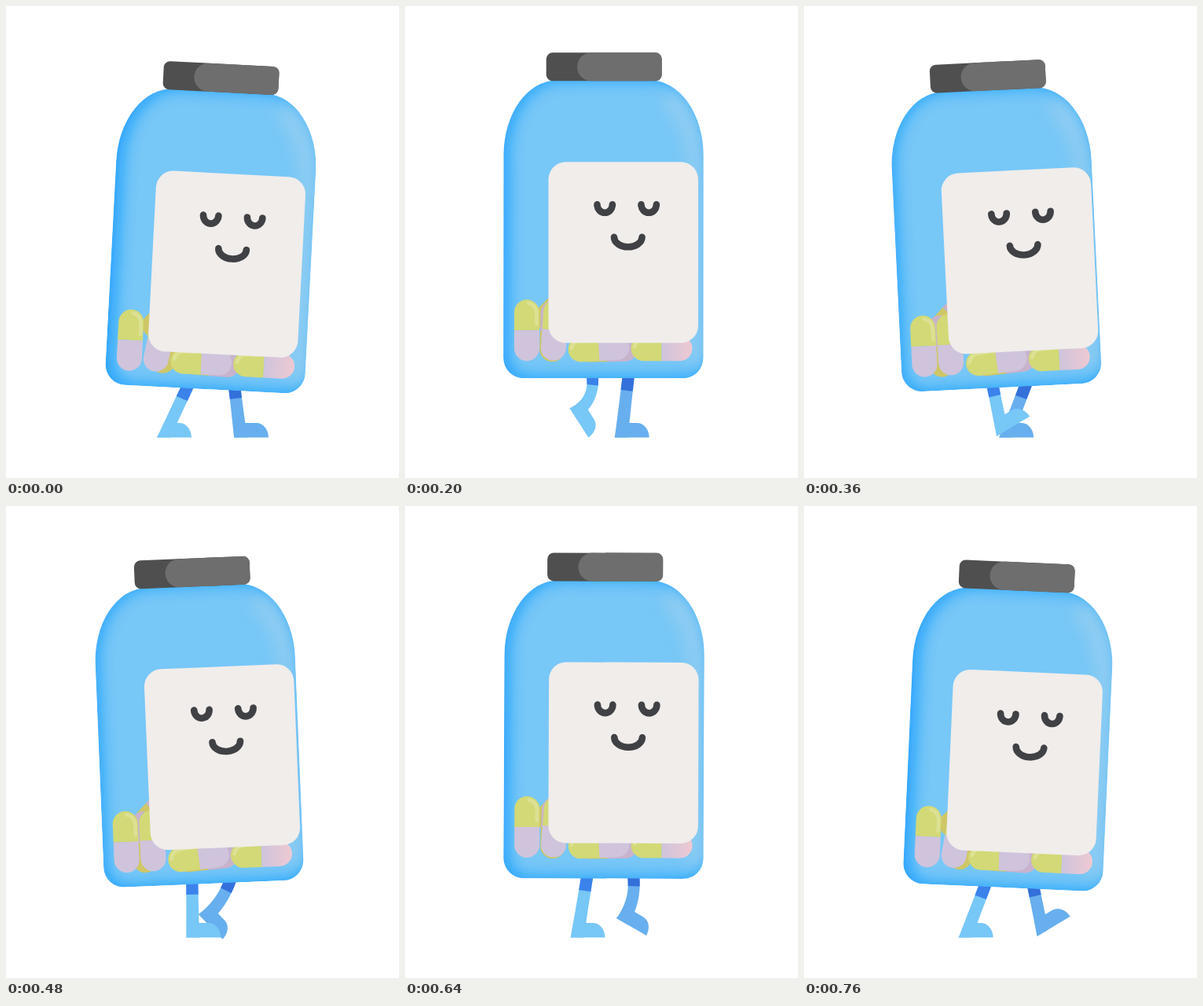
Recreate the animation shown at these times as an HTML page. Size 500 px wide and 600 px high, loop 800 ms.

```html
<!DOCTYPE html>
<html lang="en">
<head>
<meta charset="utf-8">
<title>Walking pill bottle</title>
<style>
  html, body { margin: 0; width: 100%; height: 100%; overflow: hidden; background: #fff; }
  svg { display: block; width: 100vw; height: 100vh; }
</style>
</head>
<body>
<svg viewBox="0 0 500 600">
  <defs>
    <path id="shape" d="M193.500 95H311.500A68 95 0 0 1 379.700 190L379.500 448A26 26 0 0 1 353.500 474H151.200A26 26 0 0 1 125.200 448L125.500 190A68 95 0 0 1 193.500 95Z"/>
    <clipPath id="inside"><use href="#shape"/></clipPath>
    <filter id="soft" filterUnits="userSpaceOnUse" x="0" y="0" width="500" height="600">
      <feGaussianBlur stdDeviation="10"/>
    </filter>
    <linearGradient id="rosy" x2="0" y2="1">
      <stop offset="0" stop-color="#cfc4dc"/>
      <stop offset="1" stop-color="#eec9d2"/>
    </linearGradient>
  </defs>

  <g id="back"></g>
  <g id="front"></g>

  <g id="bottle">
    <g clip-path="url(#inside)">
      <use href="#shape" fill="#77c7f7"/>
      <g id="glow">
        <path id="rim" fill="#0c97ff" fill-rule="evenodd" opacity=".82" filter="url(#soft)"/>
      </g>
      <path d="M334 114C357 137 371 166 373 225V455" fill="none" stroke="#a2d2ee" stroke-width="24" opacity=".6" filter="url(#soft)"/>
    </g>
    <g id="pills"></g>
    <g id="label">
      <rect x="182.5" y="199" width="190.5" height="230" rx="22" fill="#f0edeb"/>
      <g fill="none" stroke="#404145" stroke-width="8.6" stroke-linecap="round">
        <path d="M244.5 253a9.7 10.5 0 0 0 19.4 0"/>
        <path d="M300.5 253a9.7 10.5 0 0 0 19.4 0"/>
        <path d="M266 294.5a17.8 12.5 0 0 0 35.6 0"/>
      </g>
    </g>
    <rect x="179.7" y="60" width="147" height="36" rx="8" fill="#4f4f4f"/>
    <path d="M237 60H318.700a8 8 0 0 1 8 8V88a8 8 0 0 1-8 8H237a18 18 0 0 1 0-36Z" fill="#6e6e6e"/>
  </g>
</svg>
<script>
const LOOP = 800, STEP = 40, HALF = LOOP / 2, TAU = 2 * Math.PI;
const FLOOR = 548.5, BASE = 474;
const $ = id => document.getElementById(id);

function add(parent, tag, attrs = {}) {
  const el = document.createElementNS('http://www.w3.org/2000/svg', tag);
  for (const k in attrs) el.setAttribute(k, attrs[k]);
  return parent.appendChild(el);
}

// --- body rhythm ---
const wave = (t, period) => Math.cos(TAU * t / period);
const hop = (t, start, len) =>
  Math.sin(Math.PI * Math.min(1, Math.max(0, (t - start) / len)));
const lean = t => 2.95 * wave(t, LOOP) - .7 * hop(t, 480, 320);
const bob = t => -.7 + 13.7 * ((1 + wave(t, HALF)) / 2) ** 1.6;
const lift = t => 4 * hop(t, 120, 200) + 8 * hop(t, 480, 320) - .7;

// --- legs ---
// Stride poses: time, heel x, heel height, foot tilt, knee bend.
const STRIDE = [
  [0, 290, 0, 0, 0],
  [400, 243.5, 0, 0, 0],
  [480, 245, 29.5, 46, 9],
  [520, 248.5, 49, 83, 24],
  [640, 269, 24.5, 30, 12],
  [760, 296.5, 1.5, -31, 0]
];

// Smooth periodic blend of one column of the poses.
function blend(t, col) {
  const n = STRIDE.length;
  const at = i => {
    const row = STRIDE[(i + n) % n];
    return [row[0] + LOOP * Math.floor(i / n), row[col]];
  };
  const slope = i => {
    const [a, b, c] = [at(i - 1), at(i), at(i + 1)];
    const h = b[0] - a[0], k = c[0] - b[0];
    return ((b[1] - a[1]) / h * k + (c[1] - b[1]) / k * h) / (h + k);
  };
  let i = n - 1;
  while (STRIDE[i][0] > t) i--;
  const [t0, v0] = at(i), [t1, v1] = at(i + 1);
  const h = t1 - t0, u = (t - t0) / h, w = 1 - u;
  return v0 * w * w * (1 + 2 * u) + v1 * u * u * (3 - 2 * u)
    + h * u * w * (slope(i) * w - slope(i + 1) * u);
}

function pose(p) {
  if (p > HALF) return [1, 2, 3, 4].map(col => blend(p, col));
  const [from, to] = [STRIDE[0][1], STRIDE[1][1]];
  return [from + (to - from) * p / HALF, 0, 0, 0];
}

function makeLeg(host, skin, cloth) {
  const [foot, leg, cuff] = [skin, skin, cloth].map(fill => add(host, 'path', { fill }));
  return { foot, leg, cuff };
}
const backLeg = makeLeg($('back'), '#67afee', '#3470da');
const frontLeg = makeLeg($('front'), '#77c7f7', '#3b82eb');

const quad = (a, b, c, u) => [0, 1].map(i =>
  a[i] * (1 - u) ** 2 + 2 * b[i] * u * (1 - u) + c[i] * u * u);
const off = (pt, n, d) => [pt[0] + n[0] * d, pt[1] + n[1] * d];

function normal(from, to) {
  const dx = to[0] - from[0], dy = to[1] - from[1], d = Math.hypot(dx, dy);
  return [dy / d, -dx / d];
}

// Outline between two curved edges, down to the fraction `end`.
function strip(left, right, end) {
  const a = [], b = [];
  for (let i = 0; i <= 14; i++) {
    a.push(quad(...left, end * i / 14));
    b.unshift(quad(...right, end * i / 14));
  }
  return 'M' + a.concat(b).map(p => p.map(v => v.toFixed(2)).join(' ')).join('L') + 'Z';
}

function drawLeg(parts, p, shift, hipY) {
  const [heel, height, deg, knee] = pose(p);
  const x = heel + shift, y = FLOOR - height;
  const r = deg * Math.PI / 180, c = Math.cos(r), s = Math.sin(r);
  const len = 44 + 10 * Math.max(0, -s);
  const hip = [287 + 4 * wave(p + 80, LOOP) + shift, hipY];
  const ankle = [x + 8.5 * c, y + 8.5 * s];
  const n = normal(hip, ankle);
  const mid = off([(hip[0] + ankle[0]) / 2, (hip[1] + ankle[1]) / 2], n, knee);
  const top = normal(hip, mid);
  const edge = (d, end) => [off(hip, top, d), off(mid, n, d), end];
  const left = edge(-7.6, [x, y]);
  const right = edge(7.6, [x + 17 * c, y + 17 * s]);

  parts.leg.setAttribute('d', strip(left, right, 1));
  parts.cuff.setAttribute('d', strip(left, right, .265 - knee * .002));
  parts.foot.setAttribute('d',
    `M0 0H${len}C${len - .5} -11 ${len - 7} -18.5 ${len - 16} -18.5H${len - 33}Z`);
  parts.foot.setAttribute('transform', `translate(${x} ${y}) rotate(${deg})`);
}

// --- pills: upright capsules centred on the origin ---
const YELLOW = '#d3d976', LILAC = '#cfc4dc', OCHRE = '#cfc667', MAUVE = '#c8b3cd';

function makePill(topColor, lowColor, shine) {
  const g = add($('pills'), 'g');
  add(g, 'path', { d: 'M-16 0V-23a16 16 0 0 1 32 0V0Z', fill: topColor });
  add(g, 'path', { d: 'M-16 0V23a16 16 0 0 0 32 0V0Z', fill: lowColor });
  if (shine) add(g, 'path', {
    d: 'M2 -34.5Q12 -32 12.5 -21V-8', fill: 'none', stroke: '#fff',
    'stroke-width': 4.5, 'stroke-linecap': 'round', opacity: .22
  });
  return (x, y, deg) => g.setAttribute('transform', `translate(${x} ${y}) rotate(${deg})`);
}
const slanted = makePill(MAUVE, OCHRE);
const hidden = makePill(MAUVE, OCHRE);
const under = makePill(OCHRE, MAUVE);
const second = makePill(YELLOW, LILAC, true);
const first = makePill(YELLOW, LILAC, true);
const flat = makePill(YELLOW, LILAC, true);
const last = makePill(YELLOW, 'url(#rosy)', true);

$('rim').setAttribute('d', 'M60 30H450V540H60Z' + $('shape').getAttribute('d'));

function draw(t) {
  const a = lean(t), dy = bob(t), up = lift(t);
  $('bottle').setAttribute('transform',
    `translate(253 ${BASE + dy}) rotate(${a}) translate(-253 ${-BASE})`);
  $('glow').setAttribute('transform', `translate(${5 + .9 * a} -1)`);
  $('label').setAttribute('transform', `translate(${-1.65 * a} 0)`);

  slanted(197 + 1.5 * a, 380, 45);
  hidden(188 + 4 * a, 417 - up, 2 + a);
  under(257, 440 - up, a - 91);
  second(190.5 + .7 * a, 415.5 - up, 4 + 1.7 * a);
  first(155, 416 - up, 0);
  flat(246.5, 439 - up, -93 + .8 * a);
  last(326.5, 439 - up, -90);

  drawLeg(backLeg, t, 0, BASE - 6 + dy);
  drawLeg(frontLeg, (t + HALF) % LOOP, -51.5, BASE - 6 + dy);
}

function tick() {
  const t = (performance.now() + 1) % LOOP;
  draw(Math.floor(t / STEP) * STEP);
  requestAnimationFrame(tick);
}
tick();
</script>
</body>
</html>
```
